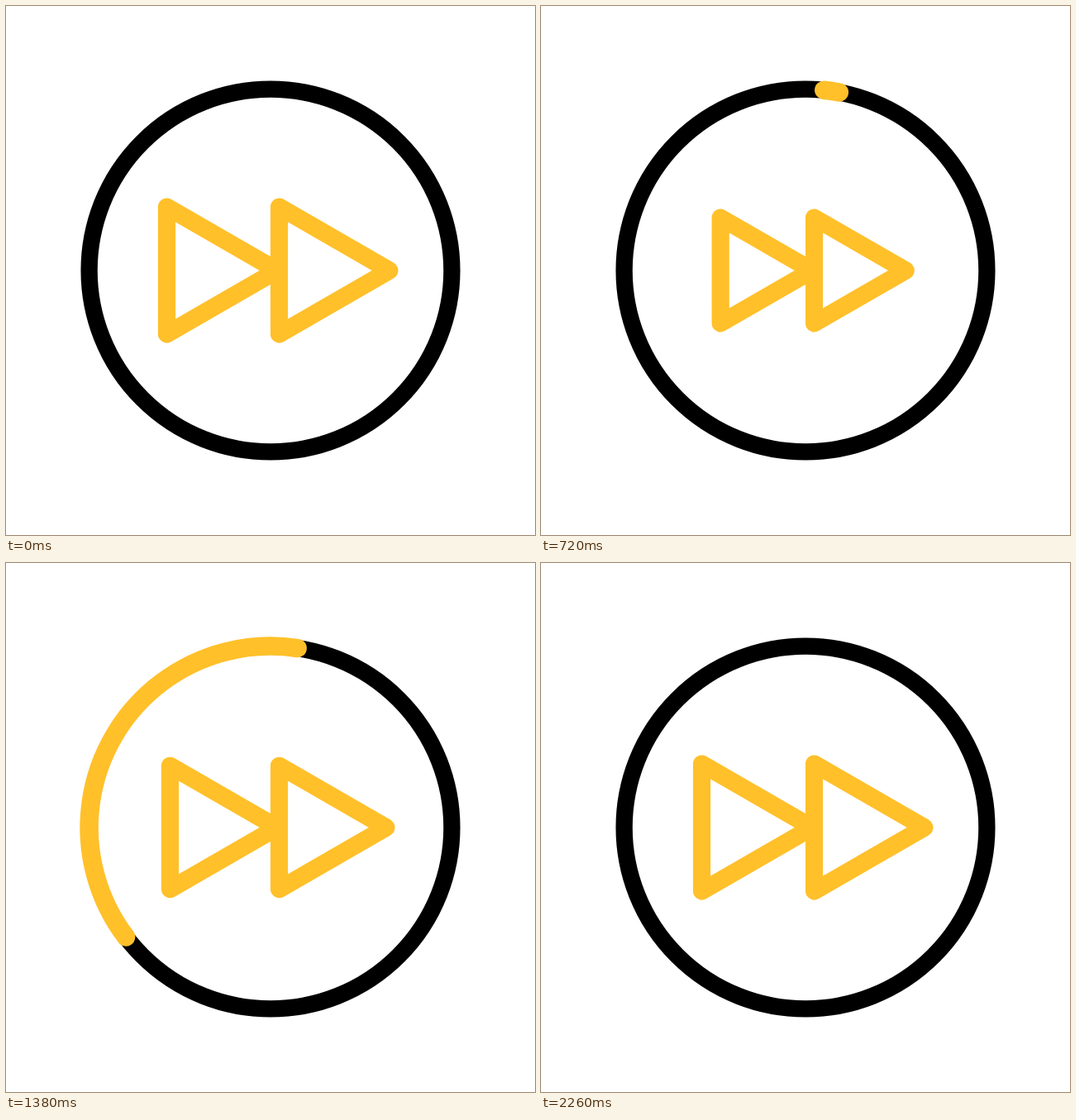
An HTML page with a canvas that plays this animation: 640 by 640 pixels, repeating every 2720 ms.

```html
<!DOCTYPE html>
<html lang="en">
<head>
<meta charset="utf-8">
<title>Fast forward</title>
<style>
  html, body { margin: 0; width: 100%; height: 100%; overflow: hidden; background: #fff; }
  canvas { display: block; width: 100vmin; height: 100vmin; }
</style>
</head>
<body>
<canvas id="stage" width="640" height="640"></canvas>
<script>
const ctx = document.getElementById('stage').getContext('2d');
const LOOP = 2720, STEP = 20;
const CENTER = 320, RADIUS = 219.4;
const YELLOW = '#ffc02a';
const SWEEP_START = 600, SWEEP = 720;

// Progress from 0 to 1 along cubic-bezier(x1, 0, x2, 1); the defaults give a smoothstep.
function ease(t, start, duration, x1 = 1 / 3, x2 = 2 / 3) {
  const u = Math.min(1, Math.max(0, (t - start) / duration));
  let low = 0, high = 1;
  for (let i = 0; i < 24; i++) {
    const s = (low + high) / 2, r = 1 - s;
    const x = 3 * x1 * s * r * r + 3 * x2 * s * s * r + s * s * s;
    if (x < u) low = s; else high = s;
  }
  return low * low * (3 - 2 * low);
}

function strokeWith(color, width) {
  ctx.strokeStyle = color;
  ctx.lineWidth = width;
  ctx.stroke();
}

// Angles in degrees clockwise from the top.
function ring(from, to, color, width) {
  const angle = degrees => (degrees - 90) * Math.PI / 180;
  ctx.beginPath();
  ctx.arc(CENTER, CENTER, RADIUS, angle(from), angle(to));
  strokeWith(color, width);
}

function arrow(baseX, tipX, halfHeight) {
  ctx.beginPath();
  ctx.moveTo(baseX, CENTER - halfHeight);
  ctx.lineTo(tipX, CENTER);
  ctx.lineTo(baseX, CENTER + halfHeight);
  ctx.closePath();
  strokeWith(YELLOW, 21.2);
}

function draw(t) {
  ctx.fillStyle = '#fff';
  ctx.fillRect(0, 0, 640, 640);

  ring(0, 360, '#000', 20.3);
  const head = SWEEP * ease(t, SWEEP_START, 1610, 0.352, 0.587);
  const tail = SWEEP * ease(t, SWEEP_START, 1540, 0.498, 0.869);
  if (head - tail > 0.05) ring(tail, head, YELLOW, 22.5);

  // A slight swell, a squeeze, then a slow return to full size.
  const scale = 1 + 0.03 * ease(t, 0, 200) - 0.21 * ease(t, 200, 600) + 0.18 * ease(t, 800, 780);
  const width = 133.5 * scale, halfHeight = 77 * scale;
  arrow(328 - width, 328, halfHeight);
  arrow(330.5, 330.5 + width, halfHeight);
}

ctx.lineCap = ctx.lineJoin = 'round';
const start = performance.now();

function tick() {
  const t = (performance.now() - start) % LOOP;
  draw(Math.floor(t / STEP) * STEP);
  requestAnimationFrame(tick);
}
tick();
</script>
</body>
</html>
```
